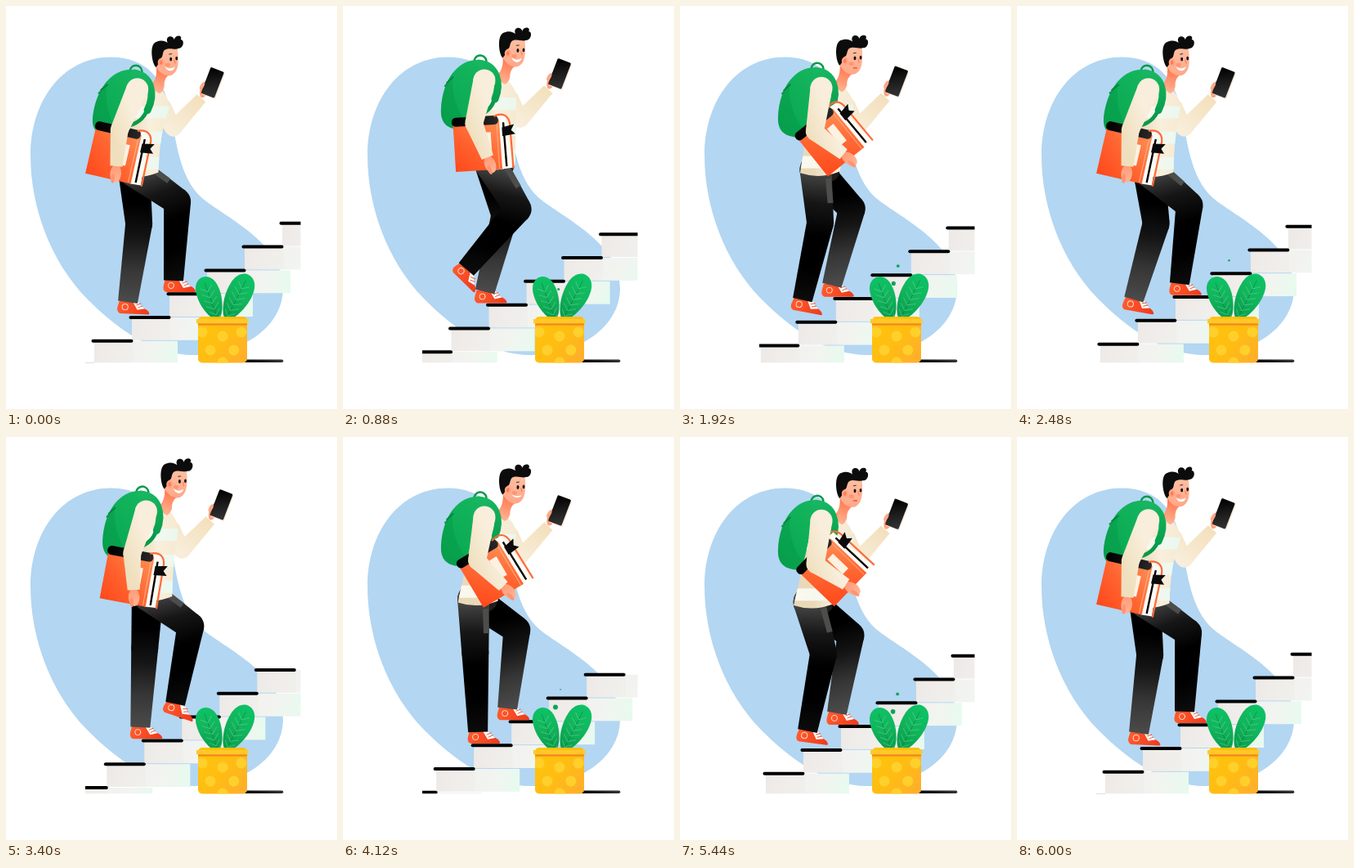
Animation of 405x493 px, one loop 6040 ms. Source, as an HTML page with a canvas:

```html
<!DOCTYPE html>
<html lang="en">
<head>
<meta charset="utf-8">
<title>Student on the stairs</title>
<style>
  html, body { margin: 0; width: 100%; height: 100%; overflow: hidden; background: #fff; }
  canvas { display: block; width: 405px; height: 493px; }
</style>
</head>
<body>
<canvas id="stage"></canvas>
<script>
const W = 405, H = 493, LOOP = 6040, CYCLE = 1200, FRAME = 40;
const STEP_X = 46, STEP_Y = 28.8;
const canvas = document.getElementById('stage');
const g = canvas.getContext('2d');
const dpr = window.devicePixelRatio || 1;
canvas.width = W * dpr;
canvas.height = H * dpr;

const shapes = {
  blob: 'M128 62.5C172 62.5 193 90 201 128C209 172 214 217 245 239C284 267 339 295 339 345C339 395 285 427 230 427C180 427 137 396 99 358C54 312 30 245 30 183C30 115 70 62.5 128 62.5Z',
  pack: 'M-32 18C-30-20-10-42 12-42C32-42 37-28 35-8C33 15 20 42-2 43C-24 44-33 36-32 18Z',
  packShade: 'M-32 18C-31 0-26-14-18-25C-20-2-12 28 8 41C-18 49-33 38-32 18Z',
  strapTop: 'M14-38C36-36 42-14 34 6',
  strapEnd: 'M34 4C31 16 24 24 8 28',
  face: 'M-12-15L13-13C15 2 15 14 7 19C-1 23-10 16-13 9Z',
  hair: 'M-13 10C-18 6-22-18-13-21C-6-24-2-22 1-20C-3-29 8-30 9-24C11-31 20-29 17-24C22-24 21-13 14-13C10-11 2-15-3-11C-6-7-4-2-8-1L-9 4Z',
  neck: 'M-13 6L3 19Q-4 24-3 34Q-5 41-9 42Q-16 39-18 30Q-11 24-13 6Z',
  smile: 'M-2 9C2 12 6 12 10 9C9 16 0 16-2 9Z',
  shoe: 'M-10-2L8-2C13 6 26 6 27 13Q27 14 25 14L-9 14Q-14 12-12 5Z',
  tongue: 'M6-1L14 0C15 4 19 5 21 7L12 9Z',
  flag: 'M31-20L46-23L42-16L47-11L31-9Z'
};
for (const k in shapes) shapes[k] = new Path2D(shapes[k]);

// Smooth 0..1 as v goes from a to b.
function ease(a, b, v) {
  const u = Math.min(1, Math.max(0, (v - a) / (b - a)));
  return u * u * (3 - 2 * u);
}
const wave = (p, peak, period) => Math.cos(2 * Math.PI * (p - peak) / period);
// Point at a distance from another; the angle leans back from straight down.
function hang([x, y], length, deg) {
  const a = deg * Math.PI / 180;
  return [x - Math.sin(a) * length, y + Math.cos(a) * length];
}

function fill(path, style) { g.fillStyle = style; g.fill(path); }
function ramp(x0, y0, x1, y1, ...stops) {
  const r = g.createLinearGradient(x0, y0, x1, y1);
  stops.forEach((c, i) => r.addColorStop(i / (stops.length - 1), c));
  return r;
}
function poly(points, style) {
  g.beginPath();
  points.forEach(p => g.lineTo(p[0], p[1]));
  g.closePath();
  g.fillStyle = style;
  g.fill();
}
function oval(x, y, rx, ry, style, rot = 0) {
  g.beginPath();
  g.ellipse(x, y, rx, ry, rot, 0, 7);
  g.fillStyle = style;
  g.fill();
}
function line(x0, y0, x1, y1, width, style, cap = 'round') {
  g.beginPath();
  g.moveTo(x0, y0);
  g.lineTo(x1, y1);
  g.lineWidth = width;
  g.lineCap = cap;
  g.strokeStyle = style;
  g.stroke();
}
function place([x, y], deg, draw) {
  g.save();
  g.translate(x, y);
  g.rotate(deg * Math.PI / 180);
  draw();
  g.restore();
}
// Tapered limb with round joints and a flat end.
function limb(joints, widths, style) {
  for (let i = 0; i < joints.length - 1; i++) {
    const [a, b] = [joints[i], joints[i + 1]];
    const [v, w] = [widths[i] / 2, widths[i + 1] / 2];
    const len = Math.hypot(b[0] - a[0], b[1] - a[1]);
    const nx = (a[1] - b[1]) / len, ny = (b[0] - a[0]) / len;
    poly([[a[0] + nx * v, a[1] + ny * v], [b[0] + nx * w, b[1] + ny * w],
          [b[0] - nx * w, b[1] - ny * w], [a[0] - nx * v, a[1] - ny * v]], style);
    oval(a[0], a[1], v, v, style);
  }
}

function stairs(p) {
  const steps = [];
  for (let i = -2; i < 9; i++) {
    const n = i - 2 * p / CYCLE;
    const x = 105.5 + n * STEP_X, y = 409.8 - n * STEP_Y;
    if (y > 262) steps.push([x, y]);
  }
  g.save();
  g.beginPath();
  g.rect(97, 250, 263.5, 186.3);
  g.clip();
  for (const [x, y] of steps) {
    g.fillStyle = ramp(x + 3, y, x + 104, y + 27, '#ede9e6', '#f0eeeb', '#eef1ec', '#e0f9ea');
    g.fillRect(x + 2.5, y, 102, STEP_Y - 1);
    g.fillStyle = 'rgba(255,255,255,.2)';
    g.fillRect(x + 50, y, 54.5, STEP_Y - 1);
  }
  for (const [x, y] of steps) line(x + 1, y, x + 48, y, 4, '#000');
  g.restore();
}

// Planted foot rides down with the stairs, rolls off its heel, then swings two steps up.
function footAt(p) {
  const ride = 2 * p / CYCLE;
  const roll = ease(560, 680, p), swing = ease(700, 900, p);
  return {
    x: 205 + STEP_X * (2 * ease(825, 1055, p) - ride),
    y: 336 + STEP_Y * (ride - 2 * (roll / 6 + swing * 5 / 6)),
    tilt: 10 * roll + 35 * swing - 45 * ease(900, 1080, p)
  };
}

function kneeOf(hip, ankle) {
  const thigh = 65, shin = 97;
  const dx = ankle[0] - hip[0], dy = ankle[1] - hip[1], d = Math.hypot(dx, dy);
  const a = (thigh * thigh - shin * shin + d * d) / (2 * d);
  const h = Math.sqrt(Math.max(0, thigh * thigh - a * a));
  return [hip[0] + (dx * a + dy * h) / d, hip[1] + (dy * a - dx * h) / d];
}

function leg(hip, p, near) {
  const { x, y, tilt } = footAt(p);
  const ankle = [near ? x : x - 10, y];
  const knee = kneeOf(hip, ankle);
  place(ankle, tilt, () => {
    fill(shapes.shoe, ramp(-10, 0, 26, 12, '#ff5a2c', '#ef3a1c'));
    fill(shapes.tongue, '#fff');
    line(11, 3, 16, 1, 1, '#f4532f');
    line(13, 6, 18, 4, 1, '#f4532f');
    g.beginPath();
    g.arc(-3, 6, 3.6, 0, 7);
    g.lineWidth = 1;
    g.strokeStyle = '#ffd9c8';
    g.stroke();
  });
  const tones = near ? ['#4a4a4a', '#161616', '#000', '#000', '#0c0c0c']
                     : ['#000', '#000', '#141414', '#363636', '#4b4b4b'];
  limb([hip, knee, ankle], [39, 33, 24], ramp(hip[0], hip[1], ankle[0], ankle[1], ...tones));
  if (near) {
    const a = Math.atan2(knee[1] - hip[1], knee[0] - hip[0]) * 180 / Math.PI;
    place(hip, a, () => {
      g.fillStyle = '#4d4d4b';
      g.fillRect(12, -18, 30, 7);
    });
  }
}

function torso(s, hip) {
  const right = hip[0] + 30, left = hip[0] - 19, hem = hip[1] + 4;
  g.save();
  g.beginPath();
  g.moveTo(s[0] - 8, s[1] - 8);
  g.quadraticCurveTo(s[0] + 8, s[1] - 14, s[0] + 20, s[1] - 7);
  g.quadraticCurveTo(s[0] + 40, s[1] + 7, s[0] + 39, s[1] + 24);
  g.quadraticCurveTo(right + 1, hem - 50, right, hem - 2);
  g.quadraticCurveTo((left + right) / 2, hem + 8, left, hem);
  g.closePath();
  g.fillStyle = ramp(s[0] - 10, 0, s[0] + 40, 0, '#ead9b8', '#f8efdc', '#f6e9d0');
  g.fill();
  g.clip();
  const drop = hem - s[1];
  for (const f of [.2, .5, .8]) {
    const y = s[1] + drop * f, x = s[0] + (hip[0] - s[0]) * f;
    g.fillStyle = ramp(x - 20, 0, x + 40, 0, '#fdf8ee', '#e9f8ef');
    g.fillRect(x - 40, y, 90, 15);
  }
  g.restore();
}

function head(at, tilt, grin) {
  place(at, tilt, () => {
    fill(shapes.neck, ramp(0, 8, -8, 40, '#ff6d42', '#ffb08f'));
    fill(shapes.face, ramp(0, -10, 4, 26, '#ffbd9e', '#ffa283'));
    fill(shapes.hair, '#0c0c0c');
    oval(-7, 4, 4, 5, '#ffa583');
    oval(-7, 4, 1.8, 2.6, '#ff7b54');
    oval(1, 7, 3.2, 2.4, '#ff9572');
    oval(5, 0, 1.5, 2.4, '#111');
    oval(12, -1, 1.4, 2.3, '#111');
    line(3, -6, 6, -6.6, 1, '#333');
    line(9, 1, 10.5, 5, 1.2, '#ff7a55');
    if (grin > .3) {
      g.translate(0, 10 - 10 * grin);
      g.scale(1, grin);
      fill(shapes.smile, '#fff');
    } else line(4, 12, 8, 12, 1.3, '#e0502f');
  });
}

function backpack(at, tilt) {
  place(at, tilt, () => {
    g.beginPath();
    g.arc(16, -40, 7.5, 3, 6.6);
    g.lineWidth = 2.5;
    g.strokeStyle = '#079a49';
    g.stroke();
    fill(shapes.pack, ramp(-25, 30, 30, -30, '#08a850', '#16b660'));
    fill(shapes.packShade, 'rgba(0,130,60,.25)');
    line(-25, -14, -17, -21, 1.6, '#04803b');
    line(-24, -13, -27, -10, 2.2, '#079a49');
  });
}

function strap(at, tilt) {
  place(at, tilt, () => {
    g.lineCap = 'round';
    g.lineWidth = 5;
    g.strokeStyle = '#079a49';
    g.stroke(shapes.strapEnd);
    g.lineWidth = 9;
    g.strokeStyle = ramp(20, -38, 30, 10, '#18b661', '#089f4d');
    g.stroke(shapes.strapTop);
  });
}

function book(at, tilt) {
  place(at, tilt, () => {
    poly([[26, -34], [36, -33], [41, 30], [27, 31]], '#fffaf4');
    line(33, -26, 34, 28, 2.4, '#000', 'butt');
    poly([[-28.5, -30], [28, -30], [28.5, 31], [-28.5, 31]],
         ramp(-25, 30, 25, -25, '#ff4a1c', '#ff6531', '#ff8b52'));
    line(25, -24, 25, 30, .9, '#ffb48a', 'butt');
    g.fillStyle = '#fdf1e2';
    g.fillRect(7, -15, 10, 26);
    g.beginPath();
    g.roundRect(-30, -35, 57, 11, 5);
    g.fillStyle = ramp(-30, 0, 30, 0, '#000', '#111', '#2c2c2c');
    g.fill();
    g.beginPath();
    g.moveTo(22, -34);
    g.bezierCurveTo(34, -39, 41, -33, 41, -22);
    g.lineTo(42, 31);
    g.lineWidth = 2.2;
    g.strokeStyle = '#ff6a38';
    g.stroke();
    fill(shapes.flag, '#0b0b0b');
  });
}

function farArm(shoulder, elbow, phone) {
  const [px, py] = phone, wrist = [px - 14, py + 19];
  oval(px - 10, py + 8, 5, 11, '#ffa27f', .35);
  limb([shoulder, elbow, wrist], [24, 20, 14],
       ramp(elbow[0], elbow[1] + 8, wrist[0], wrist[1], '#f8eedb', '#f3e0bc'));
  place(phone, 21, () => {
    g.fillStyle = '#ffe9d8';
    g.fillRect(-7, -15, 17, 33);
    g.beginPath();
    g.roundRect(-9, -17, 17.5, 34, 1.5);
    g.fillStyle = ramp(-8, -16, 8, 16, '#000', '#1c1c1c', '#333');
    g.fill();
  });
  oval(px - 13, py + 4, 2.2, 5, '#ffa887', .5);
}

function nearArm(shoulder, elbow, wrist) {
  const len = Math.hypot(wrist[0] - elbow[0], wrist[1] - elbow[1]);
  const dx = (wrist[0] - elbow[0]) / len, dy = (wrist[1] - elbow[1]) / len;
  place(wrist, Math.atan2(dy, dx) * 180 / Math.PI, () => {
    oval(9, 0, 11, 6.8, ramp(0, 0, 20, 0, '#ff9b78', '#ffb696'));
    oval(15, 3, 6, 2.4, '#ff9472');
  });
  limb([shoulder, elbow, wrist], [27, 22, 15],
       ramp(elbow[0] - 12, elbow[1], elbow[0] + 20, elbow[1] - 12, '#efdfbd', '#f8eedb'));
}

function person(p) {
  const bob = wave(p, 40, CYCLE / 2);
  const reach = (1 - wave(p, 40, CYCLE)) / 2;   // 0 arm back, 1 arm forward
  const lean = (1 - reach) ** 5;                // brief tip backwards
  const hip = [168.5 - 12 * wave(p, -10, CYCLE / 2), 197 + 5 * bob];
  const upper = (x, y) => [x - 13 * lean, y + 6.3 * bob];

  const shoulder = upper(173, 96), pack = upper(152, 113);
  const elbow = hang(shoulder, 54, 24 - 16 * reach);
  const wrist = hang(elbow, 45, 5 - 62 * reach ** 2);

  farArm(upper(203, 119), upper(217, 144), upper(265.3, 88));
  leg(hip, (p + CYCLE / 2) % CYCLE, false);
  oval(hip[0] + 7, hip[1] + 3, 22, 14, '#1d1d1d');
  leg(hip, p, true);
  backpack(pack, 5 * lean);
  torso(shoulder, hip);
  head(upper(209, 59.3), 3 - 3 * lean, Math.min(1, 6 * (1 - reach)));
  strap(pack, 5 * lean);
  book([wrist[0] - 3 - 14 * reach, wrist[1] - 15], 13 - 59 * reach ** 3);
  nearArm(shoulder, elbow, wrist);
}

function leaf(x, y, rx, ry, deg) {
  place([x, y], deg, () => {
    g.beginPath();
    g.moveTo(0, ry);
    for (const side of [-1, 1]) {
      const w = side * rx;
      const low = [w * .7, ry * .85, w * 1.15, ry * .1], mid = [w * 1.05, -ry * .35];
      const high = [w, -ry * .8, w * .5, -ry];
      if (side < 0) {
        g.bezierCurveTo(...low, ...mid);
        g.bezierCurveTo(...high, 0, -ry);
      } else {
        g.bezierCurveTo(high[2], high[3], high[0], high[1], ...mid);
        g.bezierCurveTo(low[2], low[3], low[0], low[1], 0, ry);
      }
    }
    g.fillStyle = ramp(0, ry, rx, -ry, '#069a4c', '#12b45c', '#0cc466');
    g.fill();
    line(0, -ry + 8, 0, ry, .8, 'rgba(0,110,50,.5)');
    for (let v = -ry + 14; v < ry - 4; v += 7.5) {
      const w = rx * .6 * Math.sqrt(1 - (v / ry) ** 2);
      for (const side of [-w, w]) line(0, v + 5, side, v - 1, 1, 'rgba(120,225,160,.45)');
    }
  });
}

function drop(p, start, life, x, y, fall, size) {
  const u = (p - start) / life;
  if (u <= 0 || u >= 1) return;
  const r = size * Math.sqrt(Math.sin(Math.PI * u));
  oval(x + 6 * u ** 4, y + fall * u, r, r, '#0fa458');
}

function plant(p) {
  drop(p, 30, 930, 259.5, 309, 41, 3);
  drop(p, 500, 370, 266, 308, 17, 2);
  line(290, 434.3, 337.5, 434.3, 3.6, ramp(290, 0, 338, 0, '#000', '#333'));
  leaf(250, 358, 13.5, 28, -20);
  leaf(283, 356.5, 14.5, 31, 27);
  g.save();
  g.beginPath();
  g.roundRect(235, 380, 60, 56.5, 5);
  g.fillStyle = ramp(235, 386, 290, 436, '#ffc40c', '#ffbd12', '#ffae2c');
  g.fill();
  g.clip();
  for (const y of [399, 421])
    for (const x of [240, 288]) oval(x + (y > 410 ? 265 - x : 0) * .4, y, 6.5, 6.5, '#ffd02c');
  for (const y of [404, 436]) oval(265, y, 6.5, 6.5, '#ffd02c');
  g.restore();
  g.fillStyle = '#f4861c';
  g.fillRect(235, 388, 60, 2.6);
  g.fillStyle = '#ffc928';
  g.fillRect(233, 383, 63.5, 5.3);
}

function draw(ms) {
  const t = Math.floor((ms % LOOP + 1) / FRAME) * FRAME % LOOP;
  const p = t % CYCLE;
  g.setTransform(dpr, 0, 0, dpr, 0, 0);
  g.fillStyle = '#fff';
  g.fillRect(0, 0, W, H);
  fill(shapes.blob, '#b3d6f2');
  stairs(p);
  person(p);
  plant(p);
}

let start = null;
function tick(now) {
  if (start === null) start = now;
  draw(now - start);
  requestAnimationFrame(tick);
}
draw(0);
requestAnimationFrame(tick);
</script>
</body>
</html>
```
